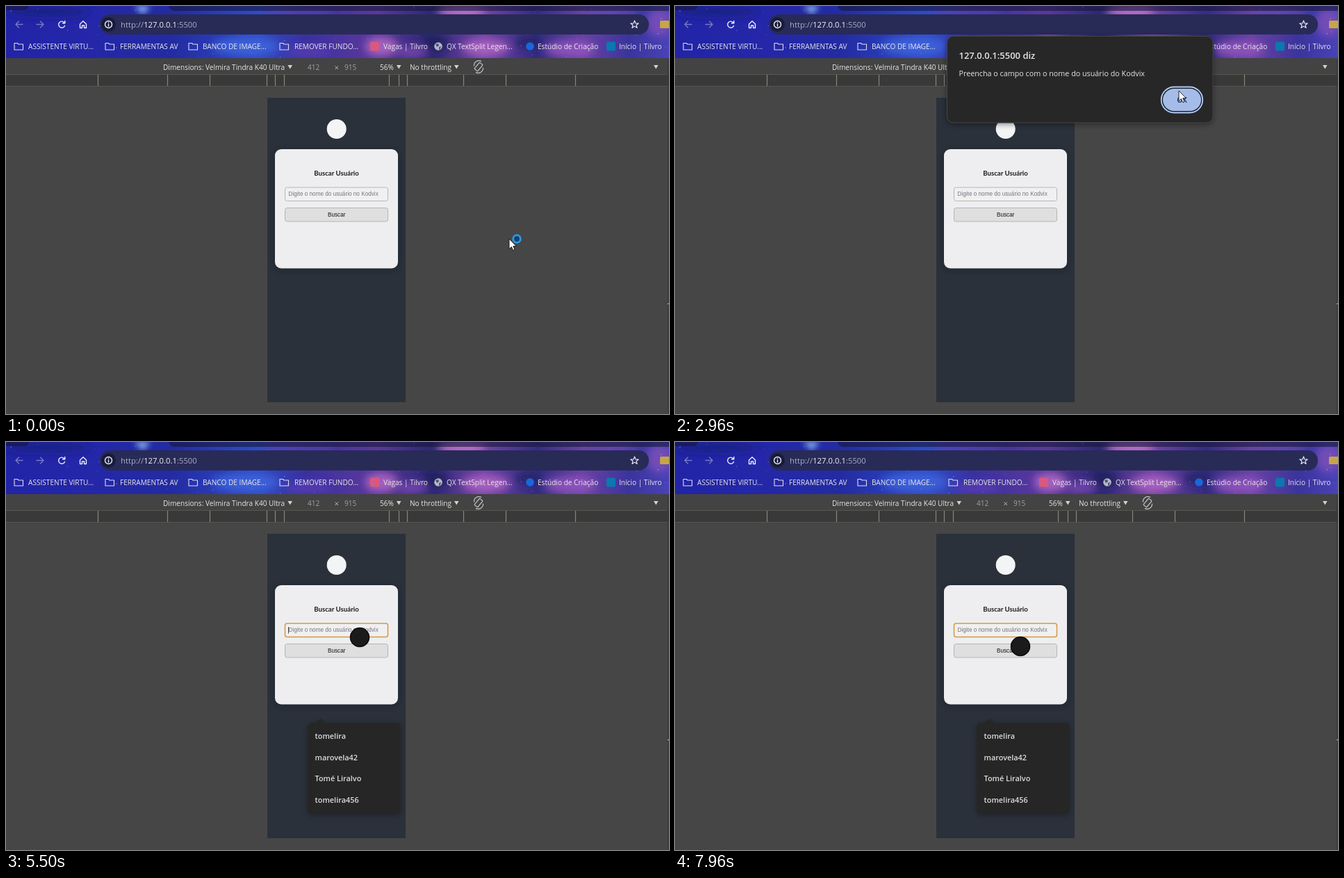
An HTML page that plays this animation: 954x587 px, repeating every 8000 ms.

```html
<!DOCTYPE html>
<html lang="pt">
<head>
<meta charset="utf-8">
<title>Buscar Usuário</title>
<style>
html, body { margin: 0; width: 100%; height: 100%; overflow: hidden; background: #464646; }
svg { display: block; width: 100%; height: 100%; }
text { font-family: "Open Sans", "Noto Sans", sans-serif; font-size: 10.1px; fill: #e6e6e6; white-space: pre; }
.form { font-family: "Liberation Sans", Arial, sans-serif; font-size: 8.2px; }
.line { fill: none; stroke: #eceefa; stroke-width: 1.4; stroke-linecap: round; stroke-linejoin: round; }
.row { font-size: 10.9px; font-weight: 600; fill: #dedede; }
.mid { text-anchor: middle; }
</style>
</head>
<body>
<svg viewBox="0 0 954 587" preserveAspectRatio="none">
  <defs>
    <linearGradient id="sky">
      <stop offset="0" stop-color="#2124a6"/><stop offset=".13" stop-color="#2427a8"/>
      <stop offset=".25" stop-color="#232ba2"/><stop offset=".38" stop-color="#2f4cc8"/>
      <stop offset=".45" stop-color="#3a31a0"/><stop offset=".56" stop-color="#5c389c"/>
      <stop offset=".64" stop-color="#2d2875"/><stop offset=".72" stop-color="#7444a6"/>
      <stop offset=".8" stop-color="#332c82"/><stop offset=".87" stop-color="#6a42a4"/>
      <stop offset=".94" stop-color="#3a349c"/><stop offset="1" stop-color="#4a42b8"/>
    </linearGradient>
    <filter id="haze" x="-50%" y="-50%" width="200%" height="200%"><feGaussianBlur stdDeviation="6"/></filter>
    <filter id="soft" x="-20%" y="-20%" width="140%" height="140%"><feGaussianBlur stdDeviation="4"/></filter>
    <clipPath id="bar"><rect width="954" height="75"/></clipPath>
  </defs>

  <rect width="954" height="587" fill="#464646"/>

  <g clip-path="url(#bar)">
    <rect width="954" height="75" fill="url(#sky)"/>
    <g id="clouds" filter="url(#haze)"></g>
    <g id="stars" fill="#c9cfff"></g>
    <path d="M0 0H33Q31 6 25 6H0ZM234 0H954V7H242Q236 6 234 0Z" fill="#16183a" opacity=".6"/>
    <path d="M184 0H208L197 12Z" fill="#9ed2ff" opacity=".85" filter="url(#soft)"/>
    <rect x="135" y="12" width="790" height="29" rx="14.500" fill="#282b56"/>
    <circle cx="147.500" cy="26.500" r="10.500" fill="#191c3c"/>
    <g class="line">
      <path d="M24 26.500H14M18.500 22L14 26.500L18.500 31M44 26.500H54M49.500 22L54 26.500L49.500 31" stroke="#7579bf"/>
      <path d="M84 24A4.600 4.600 0 1 0 84.500 28.500M84.800 21.500V24.800H81.500"/>
      <path d="M106.500 26V31.500H109.500V28H112.500V31.500H115.500V26L111 21.800Z"/>
      <circle cx="147.500" cy="26.500" r="5"/><path d="M147.500 26V29M147.500 23.800V23.900"/>
      <path d="M904.500 21L906 25H910.200L906.900 27.500L908.100 31.500L904.500 29.100L900.900 31.500L902.100 27.500L898.800 25H903Z" stroke-width="1.100"/>
    </g>
    <rect x="941" y="21" width="14" height="11" rx="1.500" fill="#c6a548"/>
    <text x="165" y="30.500" style="font-size:11.3px"><tspan fill="#a9acc8">http://</tspan><tspan fill="#f4f4fa">127.0.0.1</tspan><tspan fill="#a9acc8">:5500</tspan></text>
    <g id="bookmarks"></g>
  </g>

  <rect y="75" width="954" height="24" fill="#434343"/>
  <rect y="99" width="954" height="16" fill="#393939"/>
  <path d="M0 98.500H951M0 115.500H951" stroke="#58584f"/>
  <path id="ticks" stroke="#85857c" stroke-width="1.200"/>
  <path d="M952.500 76V587" stroke="#383838"/><path d="M952 428.500H954" stroke="#b8c8d8"/>
  <g id="tools">
    <text x="226" y="91.500">Dimensions: Velmira Tindra K40 Ultra</text>
    <text x="434" y="91.500" style="fill:#a2a2a2">412</text>
    <text x="487" y="91.500" style="fill:#a2a2a2">915</text>
    <text x="538" y="91.500">56%</text>
    <text x="581" y="91.500">No throttling</text>
    <path d="M473.500 86.500L478 91M478 86.500L473.500 91" stroke="#bbb"/>
    <path d="M405.500 85H412L408.750 90.500ZM562 85H568.500L565.250 90.500ZM645 85H651.500L648.250 90.500ZM932 85H938.500L935.250 90.500Z" fill="#d4d4cc"/>
    <g class="line" transform="translate(680 87.500) rotate(40)" style="stroke:#c4c4c4;stroke-width:1.200">
      <rect x="-3" y="-6" width="6" height="12" rx="1"/>
      <path d="M-6 3A7 7 0 0 1 -2.500 -8.500M6 -3A7 7 0 0 1 2.500 8.500"/>
    </g>
  </g>

  <rect x="376" y="132" width="199" height="438" fill="#2b313a"/>
  <circle cx="475.700" cy="177" r="14" fill="#f3f4f6"/>
  <rect x="387" y="208" width="177" height="172" rx="9" fill="#11151c" opacity=".4" filter="url(#soft)"/>
  <rect x="387" y="206" width="177" height="171.500" rx="9" fill="#eeeef1"/>
  <text class="mid" x="475.500" y="244" style="font:700 9.7px Lato,sans-serif;fill:#1c1c1c">Buscar Usuário</text>
  <rect id="field" x="401.500" y="261" width="148" height="19.500" rx="3"/>
  <text id="hint" class="form" x="406.500" y="273" style="fill:#77777a">Digite o nome do usuário no Kodvix</text>
  <text id="preview" class="form" x="406.500" y="273" style="font-size:6.5px;fill:#6a6d75"></text>
  <path id="caret" d="M406.500 266V275.500" stroke="#333" stroke-width=".9"/>
  <rect id="button" x="401.500" y="290.500" width="148" height="19.500" rx="3"/>
  <text id="label" class="form mid" x="475.700" y="303">Buscar</text>

  <g id="menu">
    <rect x="434" y="406" width="134" height="131" rx="7" fill="#000" opacity=".3" filter="url(#soft)"/>
    <path d="M444 405L452.500 398L461 405Z" fill="#262626"/>
    <rect x="434" y="404" width="134" height="131" rx="6" fill="#262626"/>
    <g id="hover">
      <rect x="437" y="408" width="127" height="30.500" rx="3" fill="#3e3e3b"/>
      <path d="M545 420L552 427M552 420L545 427" stroke="#d8d8d8" stroke-width="1.200"/>
    </g>
    <g id="rows"></g>
  </g>

  <g id="dialog">
    <rect x="391" y="46" width="383" height="124" rx="10" fill="#000" opacity=".45" filter="url(#soft)"/>
    <rect x="391.500" y="43.500" width="382.500" height="124.500" rx="9" fill="#272727" stroke="#474747"/>
    <text x="408.500" y="76" style="font-size:13px;font-weight:600">127.0.0.1:5500 diz</text>
    <text x="408.500" y="100.500" style="font-size:10.75px">Preencha o campo com o nome do usuário do Kodvix</text>
    <rect x="699.700" y="116.500" width="59.500" height="37" rx="18.500" fill="#1c222d" stroke="#b4ccf6" stroke-width="1.800"/>
    <rect x="702" y="119" width="55" height="32" rx="16" fill="#a5bce8"/>
    <text class="mid" x="729.500" y="138.500" style="fill:#14305f;font-weight:600">OK</text>
  </g>

  <circle id="touch" r="13.500" fill="#1b1b1b" stroke="#0b0b0b" stroke-width="1.500"/>
  <g id="arrow">
    <path d="M0 0V14.500L3.400 11.500L5.700 16.600L8 15.600L5.800 10.600H10.300Z" fill="#fff" stroke="#111" stroke-width=".9"/>
    <circle id="busy" cx="11" cy="0" r="5.300" fill="#14416b" stroke="#2a9be6" stroke-width="2.800"/>
  </g>
</svg>
<script>
const LOOP = 8000;
const $ = id => document.getElementById(id);
const show = (id, on) => $(id).style.display = on ? '' : 'none';
const put = (id, html) => $(id).innerHTML = html;

// [x, y, rx, ry, color]
const clouds = [
  [345, 58, 48, 13, '#3f66dc'], [435, 66, 32, 8, '#5a3cb4'], [540, 58, 24, 14, '#b068c4'],
  [585, 66, 22, 8, '#7a48b4'], [618, 54, 18, 12, '#1f1f5c'], [655, 8, 34, 10, '#c878d2'],
  [690, 60, 34, 12, '#b064c4'], [752, 52, 20, 10, '#262468'], [812, 62, 36, 12, '#9456c0'],
  [870, 8, 40, 8, '#6a48b4'], [940, 24, 18, 20, '#7c50b8'], [60, 8, 60, 6, '#1c1f78'],
  [420, 8, 50, 5, '#6648b8']
];
put('clouds', clouds.map(([x, y, rx, ry, c]) =>
  `<ellipse cx="${x}" cy="${y}" rx="${rx}" ry="${ry}" fill="${c}" opacity=".85"/>`).join(''));

let seed = 11;
const random = () => (seed = seed * 16807 % 2147483647) / 2147483647;
put('stars', Array.from({ length: 110 }, () =>
  `<circle cx="${random() * 954}" cy="${random() * 75}" r="${0.3 + random() * 0.5}" opacity="${0.2 + random() * 0.5}"/>`).join(''));

const folder = x => `<path class="line" style="stroke-width:1.1;stroke:#dcdcec" d="M${x} 53.500h4.500l1.500 1.500h6.500v8h-12.500z"/>`;
const square = c => x => `<rect x="${x}" y="51.500" width="13" height="13" rx="2" fill="${c}"/>`;
const disc = c => x => `<circle cx="${x + 6}" cy="58" r="5.800" fill="${c}"/>`;
const globe = x => disc('#b5b7c4')(x) +
  `<path d="M${x + 2} 55l4-1 1 3-3 2zM${x + 7} 59l3-1-1 4-2 1z" fill="#50527a"/>`;
const bookmarks = [
  [12, 32, folder, 'ASSISTENTE VIRTU...'], [143, 164, folder, 'FERRAMENTAS AV'],
  [263, 283, folder, 'BANCO DE IMAGE...'], [394, 415, folder, 'REMOVER FUNDO...'],
  [524, 543, square('#d9587f'), 'Vagas | Tilvro'], [616, 634, globe, 'QX TextSplit Legen...'],
  [748, 765, disc('#1768dc'), 'Estúdio de Criação'], [864, 882, square('#0b78ae'), 'Início | Tilvro']
];
put('bookmarks', bookmarks.map(([x, tx, icon, label]) =>
  icon(x) + `<text x="${tx}" y="61.500">${label}</text>`).join(''));

$('ticks').setAttribute('d', [132, 232, 293, 375, 387, 400, 551, 565, 577, 658, 719, 819]
  .map(x => `M${x + 0.5} 99V115`).join(''));

const users = ['tomelira', 'marovela42', 'Tomé Liralvo', 'tomelira456'];
const ROW = 30.7;
put('rows', users.map((name, i) => `<text class="row" x="444.500" y="${427 + i * ROW}">${name}</text>`).join(''));

// pointer stops: [ms, x, y]
const stops = [
  [0, 724, 335], [80, 724, 335], [830, 522, 312], [1290, 520, 312], [2460, 520, 312],
  [2900, 725, 122], [3300, 725, 122], [3500, 727, 126], [3850, 727, 126], [4600, 509, 281],
  [5880, 509, 281], [6500, 491, 440], [6710, 491, 440], [7000, 492, 460], [7200, 492, 462],
  [7940, 497, 294], [LOOP, 497, 294]
];
const clamp = v => Math.min(1, Math.max(0, v));
const ramp = (t, from, to) => clamp((t - from) / (to - from));
function pointer(t) {
  const i = stops.findIndex(s => s[0] > t);
  const [t0, x0, y0] = stops[i - 1], [t1, x1, y1] = stops[i];
  const k = ramp(t, t0, t1), e = k * k * (3 - 2 * k);
  return [x0 + (x1 - x0) * e, y0 + (y1 - y0) * e];
}

function draw(t) {
  const [x, y] = pointer(t);
  const focused = t >= 5250, menuOpen = t >= 5350;
  const inPhone = x > 376 && x < 575 && y > 132 && y < 570;
  const inMenu = menuOpen && x > 434 && x < 568 && y > 404;
  const blocked = t >= 2460 && t < 3700;
  const touching = inPhone && !inMenu && !blocked;

  show('touch', touching);
  show('arrow', !touching);
  show('busy', t < 400);
  for (const id of ['touch', 'arrow']) $(id).setAttribute('transform', `translate(${x} ${y})`);

  const leave = ramp(t, 3580, 3730);
  const shown = ramp(t, 1880, 2030) * (1 - leave);
  show('dialog', shown > 0);
  $('dialog').setAttribute('opacity', shown);
  $('dialog').setAttribute('transform', `translate(0 ${-14 * leave})`);

  const blue = t >= 3660 && t < 4300;
  $('button').style.cssText = blue ? 'fill:#0a1cff;stroke:#3b49f0' : 'fill:#dfdfe0;stroke:#b5b4ad';
  $('label').style.fill = blue ? '#fff' : '#151515';

  const row = inMenu ? clamp(Math.floor((y - 408) / ROW)) : -1;
  show('menu', menuOpen);
  $('menu').setAttribute('opacity', ramp(t, 5350, 5450));
  show('hover', row >= 0);
  $('hover').setAttribute('transform', `translate(0 ${row * ROW})`);
  show('hint', row < 0);
  $('preview').textContent = users[row] || '';
  $('field').style.cssText = `fill:${row < 0 ? '#f0f0f2' : '#dce3f4'};` +
    (focused ? 'stroke:#d7993c;stroke-width:1.5' : 'stroke:#b9b7ad');
  show('caret', focused && Math.floor((t - 5250) / 500) % 2 === 0);
}

function tick() {
  draw(performance.now() % LOOP);
  requestAnimationFrame(tick);
}
tick();
</script>
</body>
</html>
```
